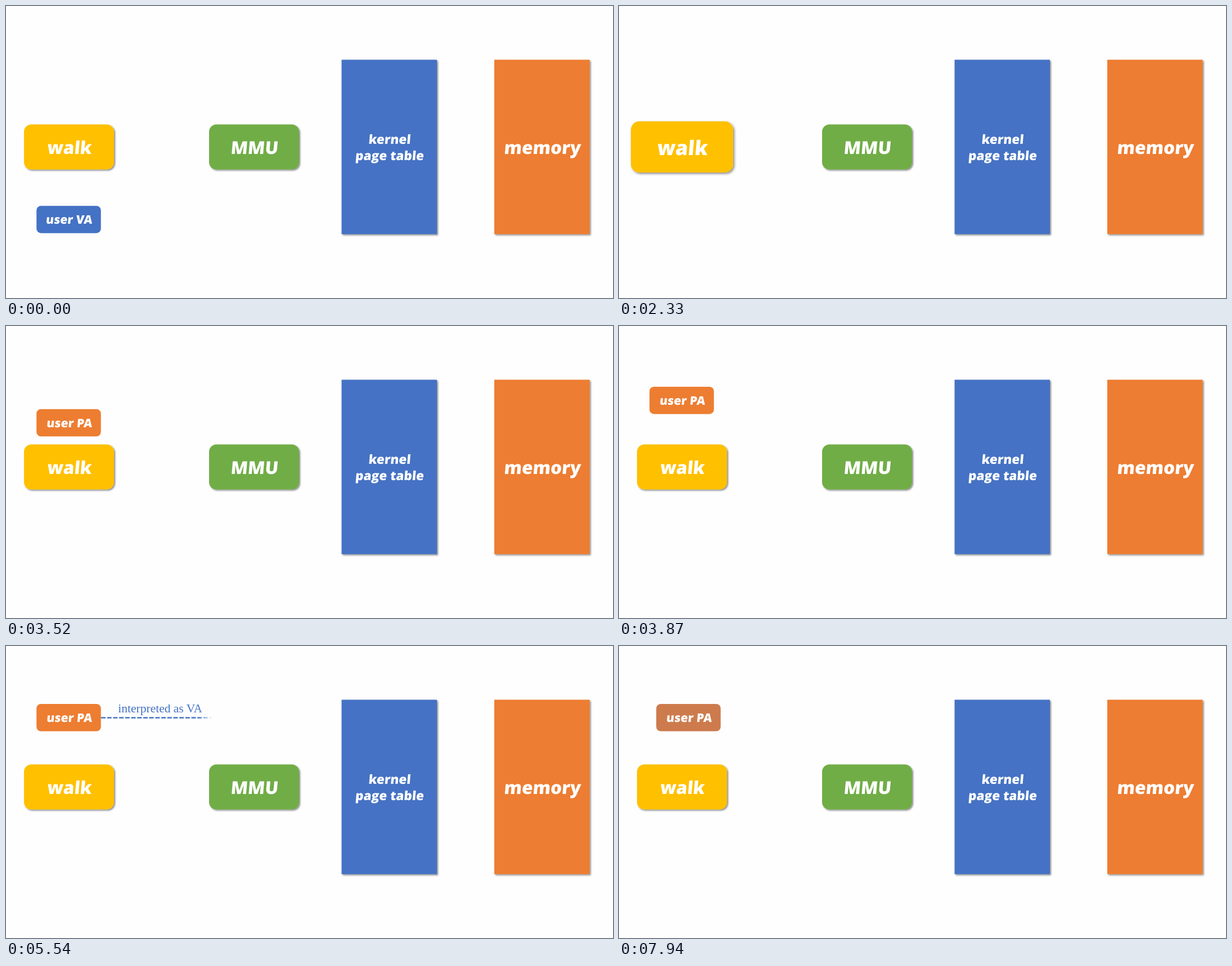
These frames come from a looping animation (1079 px wide and 519 px high, 8 s). An HTML page:

```html
<!DOCTYPE html>
<html lang="en">
<head>
<meta charset="utf-8">
<title>Address translation</title>
<style>
  html, body { margin: 0; width: 100%; height: 100%; overflow: hidden; background: #fefefe; }
  svg { display: block; width: 100%; height: 100%; }
  .label { font: 800 31.5px "Open Sans", "Noto Sans", sans-serif; fill: #fff; text-anchor: middle; }
  .mid { font-size: 22.5px; }
  .small { font-size: 21px; }
  .note { font: 21.5px "Liberation Serif", serif; fill: #4472c4; text-anchor: end; }
</style>
</head>
<body>
<svg viewBox="0 0 1079 519">
  <defs>
    <filter id="shadow" x="-10%" y="-15%" width="120%" height="130%">
      <feDropShadow dx="2" dy="2" stdDeviation="1.8" flood-opacity=".45"/>
    </filter>
    <linearGradient id="edge" gradientUnits="userSpaceOnUse" y1="0" y2="0">
      <stop stop-color="#fff"/>
      <stop offset="1" stop-color="#000"/>
    </linearGradient>
    <mask id="wipe" maskUnits="userSpaceOnUse" x="160" y="90" width="230" height="50">
      <rect x="160" y="90" width="230" height="50" fill="url(#edge)"/>
    </mask>
  </defs>

  <g id="va">
    <rect width="114.5" height="48.5" rx="8" fill="#4472c4"/>
    <text class="label small" transform="translate(57.5 32) skewX(-5)">user VA</text>
  </g>
  <g id="pa">
    <rect id="paBox" width="114.5" height="48.5" rx="8"/>
    <text class="label small" transform="translate(58 32) skewX(-5)">user PA</text>
  </g>

  <g id="walk">
    <rect x="-80" y="-40" width="160" height="80" rx="13" fill="#ffc000" filter="url(#shadow)"/>
    <text class="label" transform="translate(0 12.5) skewX(-5)">walk</text>
  </g>
  <rect x="361" y="210.5" width="160" height="80" rx="13" fill="#70ad47" filter="url(#shadow)"/>
  <text class="label" transform="translate(441 263) skewX(-5)">MMU</text>
  <rect x="596.5" y="95.5" width="169.5" height="310" fill="#4472c4" filter="url(#shadow)"/>
  <text class="label mid" transform="translate(681.5 245) skewX(-5)">kernel</text>
  <text class="label mid" transform="translate(681.5 274) skewX(-5)">page table</text>
  <rect x="868" y="95.5" width="169.5" height="310" fill="#ed7d31" filter="url(#shadow)"/>
  <text class="label" transform="translate(953 263) skewX(-5)">memory</text>

  <g id="arrow" mask="url(#wipe)">
    <text class="note" x="349" y="118">interpreted as VA</text>
    <path d="M169 127.5H373" stroke="#4472c4" stroke-width="2.7" stroke-dasharray="8 2.7"/>
    <path d="M372.5 123.5L381 127.5L372.5 131.5Z" fill="#4472c4"/>
  </g>
</svg>
<script>
const LOOP = 8000, LAST_STEP = 7940, SOFT = 25;
const $ = id => document.getElementById(id);
const progress = (t, start, length) => Math.min(1, Math.max(0, (t - start) / length));
const mix = (a, b, u) => a + (b - a) * u;
const ease = u => u < .5 ? 2 * u * u : 1 - 2 * (1 - u) ** 2;
const move = (id, x, y) => $(id).setAttribute('transform', `translate(${x} ${y})`);
const show = (id, on) => $(id).setAttribute('visibility', on ? 'visible' : 'hidden');

// Piecewise linear value through [time, value] points
function track(t, points) {
  let i = 1;
  while (i < points.length - 1 && t > points[i][0]) i++;
  const [t0, v0] = points[i - 1], [t1, v1] = points[i];
  return mix(v0, v1, progress(t, t0, t1 - t0));
}

function drawAddresses(t) {
  const sink = ease(progress(t, 1024, 1115));
  move('va', 54.2 + 1.4 * sink, 355.2 - 143 * sink);
  show('va', t < 2050);

  const rise = ease(progress(t, 2818, 1226));
  const drift = 12 * progress(t, 7500, 440) ** 2;
  move('pa', 54.2 + drift, mix(226, 103, rise));
  show('pa', t >= 2818);
  const tint = .19 * progress(t, 7470, 470);
  const rgb = [mix(237, 68, tint), mix(125, 114, tint), mix(49, 196, tint)];
  $('paBox').setAttribute('fill', `rgb(${rgb.map(Math.round)})`);
}

function drawWalk(t) {
  const pulse = Math.min(progress(t, 2060, 370), 1 - progress(t, 2430, 325));
  $('walk').setAttribute('transform', `translate(112 250.5) scale(${1 + .2 * pulse ** 1.25})`);
}

function drawArrow(t) {
  const leaving = t > 6000;
  const lead = leaving
    ? track(t, [[6140, 169], [6560, 241], [6690, 241], [6700, 246], [7460, 406]])
    : track(t, [[4705, 169], [5705, 406]]);
  $('edge').setAttribute('x1', leaving ? lead : lead - SOFT);
  $('edge').setAttribute('x2', leaving ? lead - SOFT : lead);
  show('arrow', t > 4705 && t < 7460);
}

function frame() {
  const t = Math.min(performance.now() % LOOP, LAST_STEP);
  drawAddresses(t);
  drawWalk(t);
  drawArrow(t);
  requestAnimationFrame(frame);
}
frame();
</script>
</body>
</html>
```
